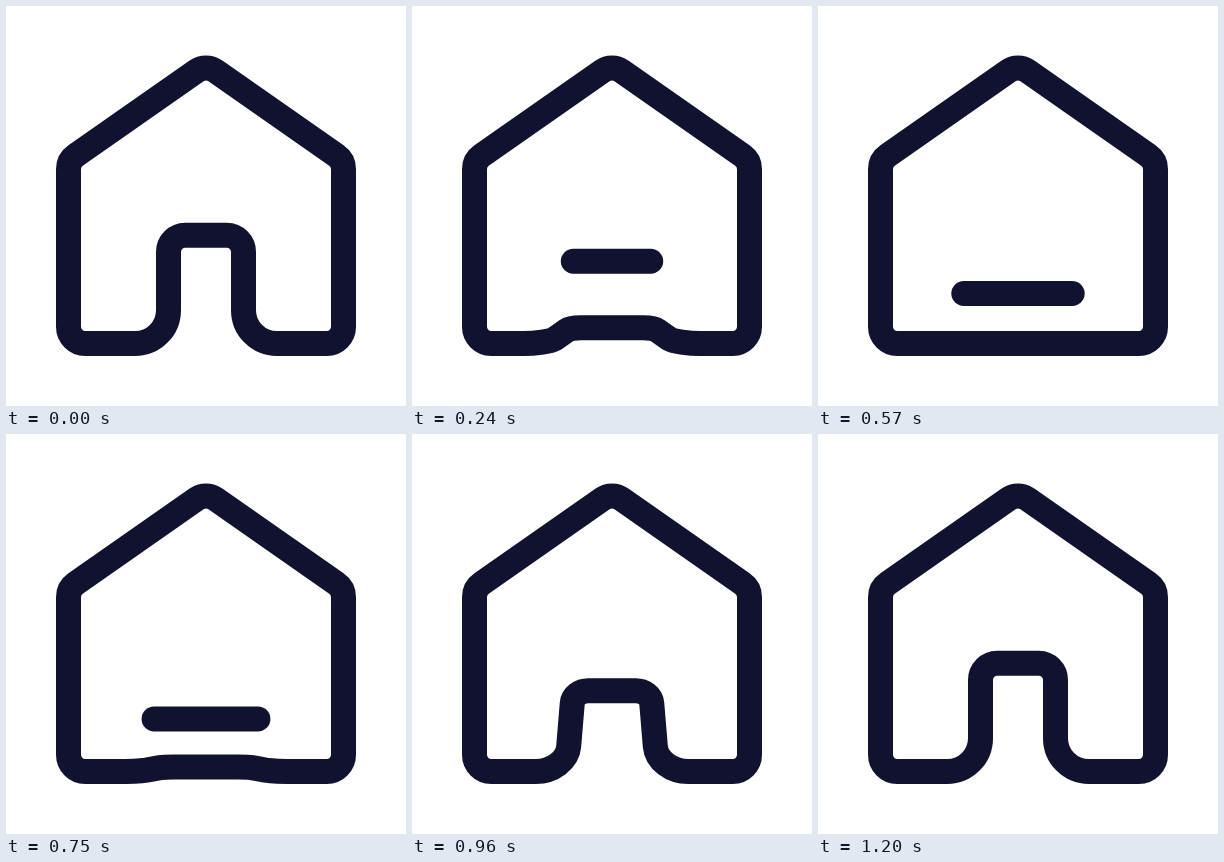
An HTML page that plays this animation: 400 px wide and 400 px high, repeating every 3230 ms.

```html
<!DOCTYPE html>
<html lang="en">
<head>
<meta charset="utf-8">
<title>Home icon</title>
<style>
  html, body { margin: 0; width: 100%; height: 100%; overflow: hidden; background: #fff; }
  svg { display: block; width: 100vw; height: 100vh; }
  path { fill: none; stroke: #11122f; stroke-width: 25; stroke-linecap: round; stroke-linejoin: round; }
</style>
</head>
<body>
<svg viewBox="0 0 400 400">
  <path id="house"/>
  <path id="bar"/>
</svg>
<script>
const LOOP = 3230, STEP = 30;
const MID = 200, WALL = 62.5, FLOOR = 337.5, LINTEL = 229.2, JAMB = 162.5;
const R = 50 / 3, FILLET = 2 * R, ROUND = 0.5523;
const PITCH = Math.atan(0.7), RIDGE = 65;

const house = document.getElementById('house');
const bar = document.getElementById('bar');

const mix = (a, b, k) => a + (b - a) * k;
const mirror = ([x, y]) => [2 * MID - x, y];
const toward = (a, b) => a.map((v, i) => mix(v, b[i], ROUND));

// Cubic bezier (x1, 0, x2, 1) over a time span
function ease(t, start, length, x1, x2) {
  const x = Math.min(1, Math.max(0, (t - start) / length));
  if (x === 0 || x === 1) return x;
  let lo = 0, hi = 1;
  for (let i = 0; i < 24; i++) {
    const s = (lo + hi) / 2, r = 1 - s;
    if (3 * r * r * s * x1 + 3 * r * s * s * x2 + s * s * s < x) lo = s; else hi = s;
  }
  return lo * lo * (3 - 2 * lo);
}

// Walls and roof, from the lower right corner round to the lower left
function shellPath() {
  const ridge = [MID - R * Math.sin(PITCH), RIDGE];
  const eave = [WALL + R - R * Math.sin(PITCH), 0];
  eave[1] = RIDGE + (ridge[0] - eave[0]) * Math.tan(PITCH);
  const wall = [WALL, eave[1] + R * Math.cos(PITCH)];
  const foot = [WALL, FLOOR - R], base = [WALL + R, FLOOR];
  const arc = p => `A${R} ${R} 0 0 0 ${p} `;
  return `L${mirror(base)} ${arc(mirror(foot))}L${mirror(wall)} ${arc(mirror(eave))}` +
    `L${mirror(ridge)} ${arc(ridge)}L${eave} ${arc(wall)}L${foot} ${arc(base)}Z`;
}
const SHELL = shellPath();

// Every doorway point sinks to the floor while drifting outward
function doorPath(flat) {
  const point = (x, y, drift) => [x - drift * flat, mix(y, FLOOR, flat)];
  const start = point(JAMB - FILLET, FLOOR, 21);
  const heel = point(JAMB, FLOOR, 32.5);
  const foot = point(JAMB, FLOOR - FILLET, 23);
  const shoulder = point(JAMB, LINTEL + R, 8.8);
  const corner = point(JAMB, LINTEL, 5);
  const top = point(JAMB + R, LINTEL, 12);
  const left = [start, toward(start, heel), toward(foot, heel), foot,
                shoulder, toward(shoulder, corner), toward(top, corner), top];
  const right = left.map(mirror).reverse();
  const side = p => `L${p[0]} C${p.slice(1, 4).join(' ')} L${p[4]} C${p.slice(5).join(' ')} `;
  return side(left) + side(right);
}

function draw(t) {
  const closing = t < 660;
  const back = ease(t, 660, 540, 0.535, 0.309);
  const flat = closing ? ease(t, 0, 390, 0.3, 0.33) : 1 - back;
  house.setAttribute('d', `M${WALL + R} ${FLOOR} ${doorPath(flat)}${SHELL}`);

  const grown = closing ? ease(t, 30, 510, 0.308, 0.15) : 1 - back;
  const sunk = closing ? ease(t, 60, 480, 0.54, 0.17) : 1 - back;
  const half = 54.2 * grown;
  const y = mix(closing ? LINTEL : 226, 287.5, sunk);
  const shown = t > 30 && t < 930;
  bar.setAttribute('d', shown ? `M${MID - half} ${y} H${MID + half}` : '');
}

const begin = performance.now();
function tick() {
  const t = (performance.now() - begin) % LOOP;
  draw(Math.floor(t / STEP) * STEP);
  requestAnimationFrame(tick);
}
tick();
</script>
</body>
</html>
```
